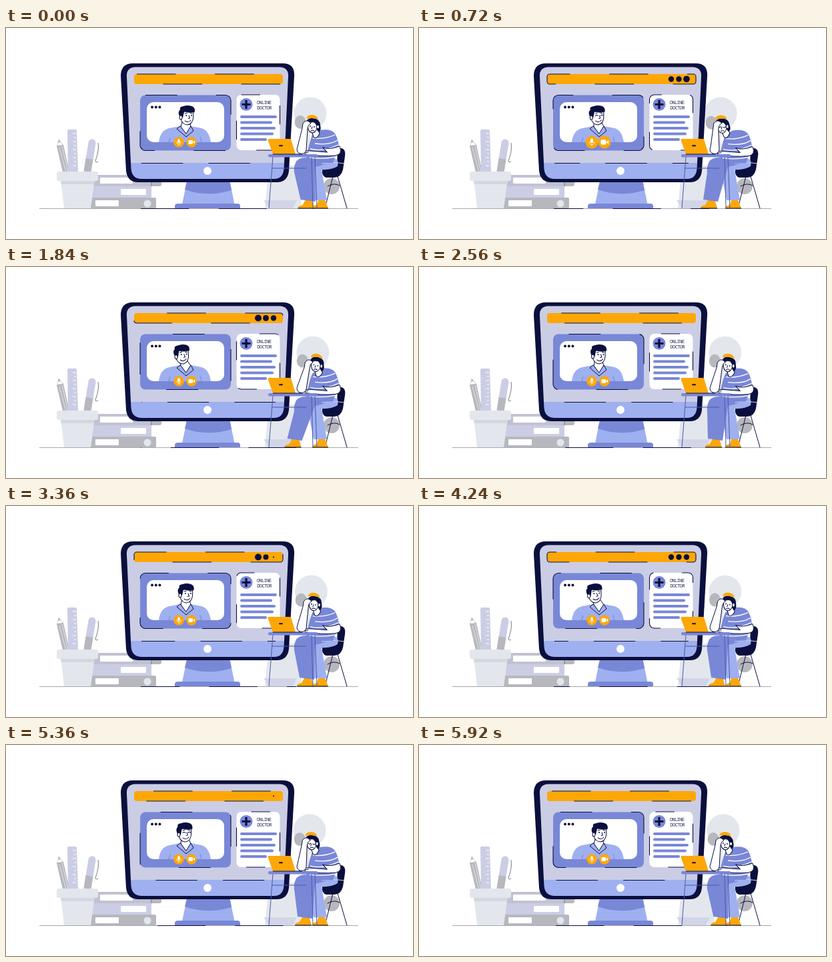
An HTML page that plays this animation: 610x316 px, repeating every 6 s.

```html
<!DOCTYPE html>
<html lang="en">
<head>
<meta charset="utf-8">
<title>Online doctor</title>
<style>
html, body { margin: 0; width: 100%; height: 100%; overflow: hidden; background: #fff; }
svg { display: block; }
.navy { fill: #0b0f3d; }
.blue { fill: #7987d7; }
.sky { fill: #9fb0f0; }
.lilac { fill: #cbcde5; }
.gold { fill: #fda707; }
.pale { fill: #e3e7ed; }
.grey { fill: #b7b8be; }
.white { fill: #fff; }
.ink { stroke: #0b0f3d; stroke-width: 1; stroke-linecap: round; stroke-linejoin: round; }
.line { fill: none; }
.dash { fill: none; stroke: #0b0f3d; stroke-width: 1.1; }
text { font: 300 7.3px "Noto Sans Mono", "Liberation Mono", monospace; letter-spacing: -.8px; fill: #2a2d58; text-anchor: middle; }
</style>
</head>
<body>
<svg width="610" height="316" viewBox="0 0 610 316">
  <!-- plant behind the desk -->
  <g id="plant">
    <circle class="pale" cx="456" cy="128" r="24.500"/>
    <path class="pale" d="M449 150h6v60h-6z"/>
    <ellipse class="grey" cx="441" cy="141" rx="8.500" ry="10"/>
  </g>
  <path class="pale" d="M394 206H449L441 270H388Z"/>
  <path class="lilac" opacity=".7" d="M386 258H436L430 270H394Z"/>
  <circle class="grey" cx="488" cy="237" r="12"/>

  <!-- pencil pot -->
  <path class="grey" d="M76 177L79 167L86 175L95 216H85Z"/>
  <path class="white" d="M77 176L79 167L85 175Z"/>
  <path class="grey" d="M77.600 172L79 166.500L82 171Z"/>
  <path d="M80 179L90 216M84 177L93 216" stroke="#e3e7ed" fill="none"/>
  <path class="lilac" d="M94 152H104Q106 152 106 154L108 216H93L92 154Q92 152 94 152Z"/>
  <path d="M100 158h5M102 164h3M100 170h5M102 176h3M100 182h5M102 188h3M100 194h5M102 200h3M100 206h5" stroke="#fff"/>
  <path d="M129 172L122 215" stroke="#cbcde5" stroke-width="11" stroke-linecap="round"/>
  <path d="M125 196L122 215" stroke="#b7b8be" stroke-width="11"/>
  <path class="line" d="M138 172Q140 183 134 199Q134 202 138 200" stroke="#777b8c"/>

  <!-- books -->
  <rect class="grey" x="124" y="220" width="109" height="17" rx="3"/>
  <path class="lilac" d="M128 220H218V237H128Z" opacity=".5"/>
  <rect class="white" x="141" y="224" width="49" height="9" rx="1"/>
  <path d="M218 220v17" stroke="#8b8e96" stroke-width="1.500"/>
  <path class="lilac" d="M128 237H218V254H128Z"/>
  <rect class="white" x="172" y="241" width="38" height="9" rx="1"/>
  <rect class="grey" x="125" y="254" width="100" height="16.500" rx="2"/>
  <rect class="white" x="134" y="258" width="35" height="9" rx="1"/>
  <circle class="pale" cx="212" cy="263" r="5.500"/>
  <path class="pale" d="M82 226H133L127 270H87Z"/>
  <path d="M82 229H132L131.500 234H82.600Z" fill="#d3d8e0"/>
  <rect class="pale" x="76" y="215" width="62" height="14" rx="3"/>

  <!-- floor -->
  <path d="M50 270.500H528" stroke="#a9a9b0"/>
  <path class="dash" data-gap="62 38" d="M202 270.500H435"/>

  <!-- monitor -->
  <path class="sky" d="M271 230H335.500L342.500 264H264Z"/>
  <path class="blue" d="M271 230H335.500L338 243Q302 254 268 242Z"/>
  <path class="blue" d="M253 270V267Q253 263 258 263H347Q351 263 351 267V270Z"/>
  <path class="navy" d="M190 53H415Q433 53 432 72L424 214Q422 231 406 231H198Q182 231 180 214L172 72Q172 53 190 53Z"/>
  <path class="lilac" d="M194 58.500H410Q424 59 423 73L417 202H187L181 73Q180 59 194 58.500Z"/>
  <path class="sky" d="M187 202H417L416.500 211Q415 226 402 226H203Q189 226 187.500 211Z"/>
  <path class="dash" data-gap="62 38" d="M203 202.500H404"/>
  <circle class="white" cx="302" cy="214" r="6"/>

  <!-- address bar -->
  <rect class="gold" x="192" y="69" width="223" height="15" rx="4"/>
  <rect class="dash" data-gap="50 50" x="192" y="69" width="223" height="15" rx="4"/>
  <g class="navy" id="dots">
    <circle cx="378" cy="76.500" r="4.200"/>
    <circle cx="389.500" cy="76.500" r="4.200"/>
    <circle cx="401" cy="76.500" r="4.200"/>
  </g>

  <!-- video call -->
  <rect class="blue" x="201" y="100.500" width="136" height="83" rx="8"/>
  <rect class="dash" data-gap="45 55" x="201" y="100.500" width="136" height="83" rx="8"/>
  <rect class="white" x="211" y="111" width="116" height="60" rx="10"/>
  <g class="navy">
    <circle cx="219" cy="118.500" r="2"/><circle cx="224.700" cy="118.500" r="2"/><circle cx="230.400" cy="118.500" r="2"/>
  </g>
  <path class="sky" d="M229 171Q231 153 245 150L261 147H277L293 150Q304 153 307 171Z"/>
  <path class="line" d="M244 171L246 164M293 171L291 163" stroke="#7987d7"/>
  <path class="white ink" id="neck"/>
  <path class="sky ink" d="M261 147L256 151L270 163L281 154L277 147L270 158Z"/>
  <g id="man">
    <path class="white ink" d="M261 126V137Q264 145 271 145Q278 144 279.500 135L280 123Z"/>
    <path class="navy" d="M260 134Q255 126 260 122Q258 118 265 117Q271 115 277 117Q283 119 281.500 126Q273 128 266 125L264 134Z"/>
    <ellipse class="white ink" cx="261" cy="134" rx="2" ry="3"/>
    <path class="line ink" d="M273 131L274.500 135L272 135.500M267 139Q272 143 276 138M267 128L270 127.500M275 127.500L278 128" stroke-width=".8"/>
    <g class="open navy"><circle cx="269" cy="131" r="1"/><circle cx="277" cy="131" r="1"/></g>
    <path class="shut line ink" d="M267 131.500Q269 129.500 271 131.500M275 131.500Q277 129.500 279 131.500"/>
  </g>
  <g class="button">
    <circle class="gold" cx="259" cy="171" r="7.800"/>
    <rect class="white" x="257.300" y="166.300" width="3.400" height="6" rx="1.700"/>
    <path class="line" d="M255.700 170.500Q256 174 259 174Q262 174 262.300 170.500M259 174V176" stroke="#fff" stroke-width=".8"/>
  </g>
  <g class="button">
    <circle class="gold" cx="278" cy="171" r="7.800"/>
    <rect class="white" x="273.500" y="168" width="6.500" height="6" rx="1.300"/>
    <path class="white" d="M280 171L283 168.500V173.500Z"/>
  </g>

  <!-- doctor card -->
  <rect class="white" x="345.500" y="100" width="65" height="83" rx="7"/>
  <rect class="dash" data-gap="40 60" x="345.500" y="100" width="65" height="83" rx="7"/>
  <circle class="blue" cx="360" cy="114.500" r="9.500"/>
  <path d="M360 108V121M353.500 114.500H366.500" stroke="#0b0f3d" stroke-width="3.200"/>
  <text x="386.500" y="113.700">ONLINE</text>
  <text x="387" y="121.700">DOCTOR</text>
  <path d="M353 133H404M353 141.500H397M353 150H402M353 158.500H399M353 167H389" stroke="#7987d7" stroke-width="4" stroke-linecap="round"/>

  <!-- chair and legs -->
  <path class="line ink" d="M490 222L478 270M497 222L511 270M482 237Q492 231 500 236"/>
  <path class="navy" d="M497 180Q510 178 508 192L505 212Q502 224 492 224H480Q473 222 474 212L496 207Z"/>
  <path class="sky" d="M449 196H494Q499 198 497 207Q488 213 473 212L481 258H461L454 222Z"/>
  <path class="gold" d="M459 270Q459 266 466 265L468 258H478L483 270Z"/>
  <path class="dash" d="M459 270H483"/>
  <g id="shoe">
    <path class="gold" d="M0 270Q0 266 7 265L12 256H21L25 270Z"/>
    <path class="dash" d="M0 270H25"/>
  </g>
  <path class="blue" id="leg"/>
  <path class="line" d="M473 203Q488 200 507 203" stroke="#cbcde5"/>

  <!-- torso -->
  <g id="torso">
    <path class="blue" d="M459 160L470 153Q487 150 493 158Q498 166 499 178L490 202H450Q452 178 459 160Z"/>
    <path class="line" d="M460 165Q477 167 493 160M463 173Q484 176 497 168M456 181Q475 186 498 175M455 194Q475 197 493 193" stroke="#fff" stroke-width="1.300"/>
    <path class="white ink" d="M475 179Q484 183 500 177Q505 189 494 191Q473 193 449 189L445 186Q449 183 456 184L481 186Z"/>
    <path class="line ink" d="M447 187L453 186M475 179L481 186"/>
  </g>

  <!-- head -->
  <g id="woman">
    <path class="white ink" d="M458 154L461 163Q465 168 470 158L467 150Z"/>
    <path class="navy" d="M450 142Q451 134 460 135Q471 136 471 146Q473 152 469 156Q466 154 465 149L455 145Z"/>
    <path class="white ink" d="M452 143Q458 140 462 141Q467 145 466 150Q464 157 459 157Q452 156 452 143Z"/>
    <path class="navy" d="M452 144Q456 138 461 138Q467 141 468 151L470 146Q469 136 459 136Q452 137 452 144Z"/>
    <ellipse class="white ink" cx="467.500" cy="148" rx="2" ry="2.800"/>
    <path class="gold" d="M450 136Q451 130 459 130Q467 131 468 137Q459 133.500 450 136Z"/>
    <g class="open navy"><circle cx="456" cy="147" r=".9"/><circle cx="462" cy="148" r=".9"/></g>
    <path class="shut line ink" d="M454 147Q456 149 458 147M461 148Q463 150 465 148" stroke-width=".8"/>
    <path class="line ink" d="M459 148L458 151M457 154Q459 152.500 462 154" stroke-width=".8"/>
  </g>
  <path class="white ink" id="arm"/>

  <!-- desk and laptop -->
  <path class="line" d="M400 193L394 270M458 193L460 270M463 193L466 270M399 210H450" stroke="#4858a5"/>
  <rect class="blue" x="393" y="189" width="74" height="4.500" rx="2"/>
  <path class="gold" d="M394 166H425Q427 166 427.500 168L434 189H400L392.500 168Q392 166 394 166Z"/>
  <rect class="navy" x="409" y="175.300" width="6" height="2" rx="1"/>
  <path class="dash" d="M400 189H444"/>
</svg>
<script>
const $ = id => document.getElementById(id);
const all = sel => [...document.querySelectorAll(sel)];
const clamp = v => Math.max(0, Math.min(1, v));
const LOOP = 6000, HALF = 3000;

// Smooth steps between [time, value] pairs.
function track(keys, t) {
  const i = keys.findIndex(k => k[0] > t);
  const [t0, a] = keys[i - 1], [t1, b] = keys[i];
  const p = (t - t0) / (t1 - t0);
  return a + (b - a) * p * p * (3 - 2 * p);
}
const footKeys = [[0, 437.5], [320, 433], [720, 422], [1300, 417], [1840, 417.5], [2600, 429], [3360, 436], [4240, 434], [5360, 433], [6000, 437.5]];
const headKeys = [[0, 0], [720, -4], [1840, 4], [3360, 1.5], [4240, 3], [5360, -1], [6000, 0]];

const dashes = all('[data-gap]');
dashes.forEach(el => {
  el.setAttribute('pathLength', el.tagName === 'rect' ? 400 : 200);
  el.setAttribute('stroke-dasharray', el.dataset.gap);
});

function dotScale(t, i) {
  const grow = t - 160 * i, shrink = t - 1700 - 100 * i;
  if (shrink > 140) return 1.2 * (1 - clamp((shrink - 140) / 360) ** 2);
  if (shrink > 0) return 1 + .2 * shrink / 140;
  if (grow < 360) return 1.2 * (1 - (1 - clamp(grow / 360)) ** 2);
  return 1.2 - .2 * clamp((grow - 360) / 200);
}

function scaleAt(el, x, y, s) {
  el.setAttribute('transform', `translate(${x} ${y}) scale(${s}) translate(${-x} ${-y})`);
}

function draw(now) {
  const t = now % LOOP, h = t % HALF;
  dashes.forEach(el => el.setAttribute('stroke-dashoffset', t / LOOP * 200));
  [...$('dots').children].forEach((dot, i) => dot.setAttribute('r', 4.2 * dotScale(h, i)));

  const sway = Math.cos(h / HALF * 2 * Math.PI) * 3.5 - 3;
  $('man').setAttribute('transform', `translate(${sway + .5} 0) rotate(${sway * .8} 270 145)`);
  $('neck').setAttribute('d', `M${264 + sway * .6} 140L262 148L270 160L277 148L${275 + sway * .6} 140Z`);
  const blink = Math.abs(h - 720) < 130 || Math.abs(h - 2380) < 130;
  all('.open').forEach(el => el.style.display = blink ? 'none' : '');
  all('.shut').forEach(el => el.style.display = blink ? '' : 'none');

  const pulse = 1 + .22 * Math.exp(-(((h - 740) / 190) ** 2));
  all('.button').forEach((el, i) => scaleAt(el, 259 + 19 * i, 171, pulse));

  const foot = track(footKeys, t), dx = track(headKeys, t);
  $('shoe').setAttribute('transform', `translate(${foot} 0)`);
  $('leg').setAttribute('d', `M434 202Q437 194 450 194H490Q480 206 463 208L${foot + 26} 260L${foot + 4} 257L432 216Q431 208 434 202Z`);
  $('woman').setAttribute('transform', `translate(${dx} 0) rotate(${dx * 1.5} 463 160)`);
  $('torso').setAttribute('transform', `translate(0 ${-dx * .15})`);
  $('plant').setAttribute('transform', `rotate(${dx * .7} 453 206)`);
  const x = dx * .8;
  $('arm').setAttribute('d', `M440 188Q434 185 437 178L${444 + x} 150L${445 + x} 143Q${449 + x} 137 ${454 + x} 140L${457 + x} 143Q${453 + x} 144 ${452 + x} 151L450 183Q448 190 440 188Z`);
  requestAnimationFrame(draw);
}
requestAnimationFrame(draw);
</script>
</body>
</html>
```
